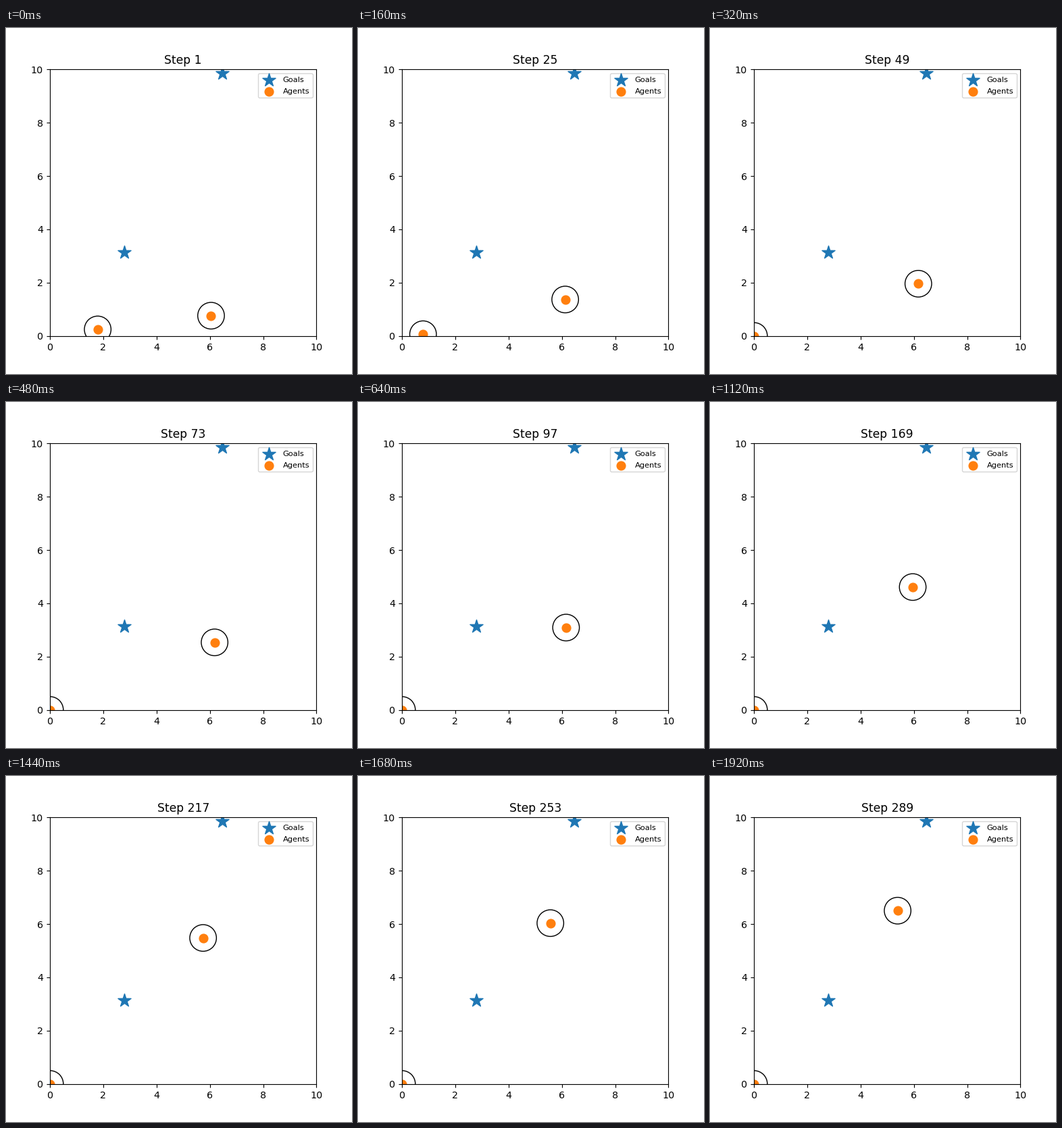
A matplotlib script for the animation above (2 s loop, 512 by 512 pixels).

```python
import numpy as np
import matplotlib.pyplot as plt
from matplotlib.animation import FuncAnimation

FRAMES = 25
INTERVAL = 80
STEPS_PER_FRAME = 12
RADIUS = 0.5


def bezier(a, b, c, d, u):
    v = 1 - u
    return v**3 * a + 3 * v**2 * u * b + 3 * v * u**2 * c + u**3 * d


def climber(i):
    """Rises on a slowing curve that bends to the left."""
    u = i / (FRAMES - 1)
    return bezier(6.045, 6.445, 5.858, 5.39, u), bezier(0.76, 3.216, 5.384, 6.504, u)


def slider(i):
    """Slides into the lower left corner and is held there."""
    return max(0, 1.79 - 0.5 * i), max(0, 0.245 - 0.09 * i)


def positions(i):
    return np.array([slider(i), climber(i)])


plt.rcParams["font.family"] = "DejaVu Sans"
fig = plt.figure(figsize=(5, 5), dpi=102.4)
ax = fig.add_axes((0.1272, 0.11, 0.77, 0.77), xlim=(0, 10), ylim=(0, 10))

start = positions(0)
ax.scatter([2.785, 6.46], [3.135, 9.85], marker="*", s=200, color="C0", label="Goals")
agents = ax.scatter(*start.T, s=80, color="C1", label="Agents")
rings = [ax.add_patch(plt.Circle(p, RADIUS, fill=False)) for p in start]
ax.legend(loc="upper right", fontsize=8, labelspacing=0.62)
title = ax.set_title("Step 1")


def update(i):
    points = positions(i)
    agents.set_offsets(points)
    for ring, point in zip(rings, points):
        ring.center = point
    title.set_text(f"Step {1 + STEPS_PER_FRAME * i}")
    return [agents, title, *rings]


anim = FuncAnimation(fig, update, frames=FRAMES, interval=INTERVAL,
                     repeat=True, repeat_delay=0, blit=False)
plt.show()
```
